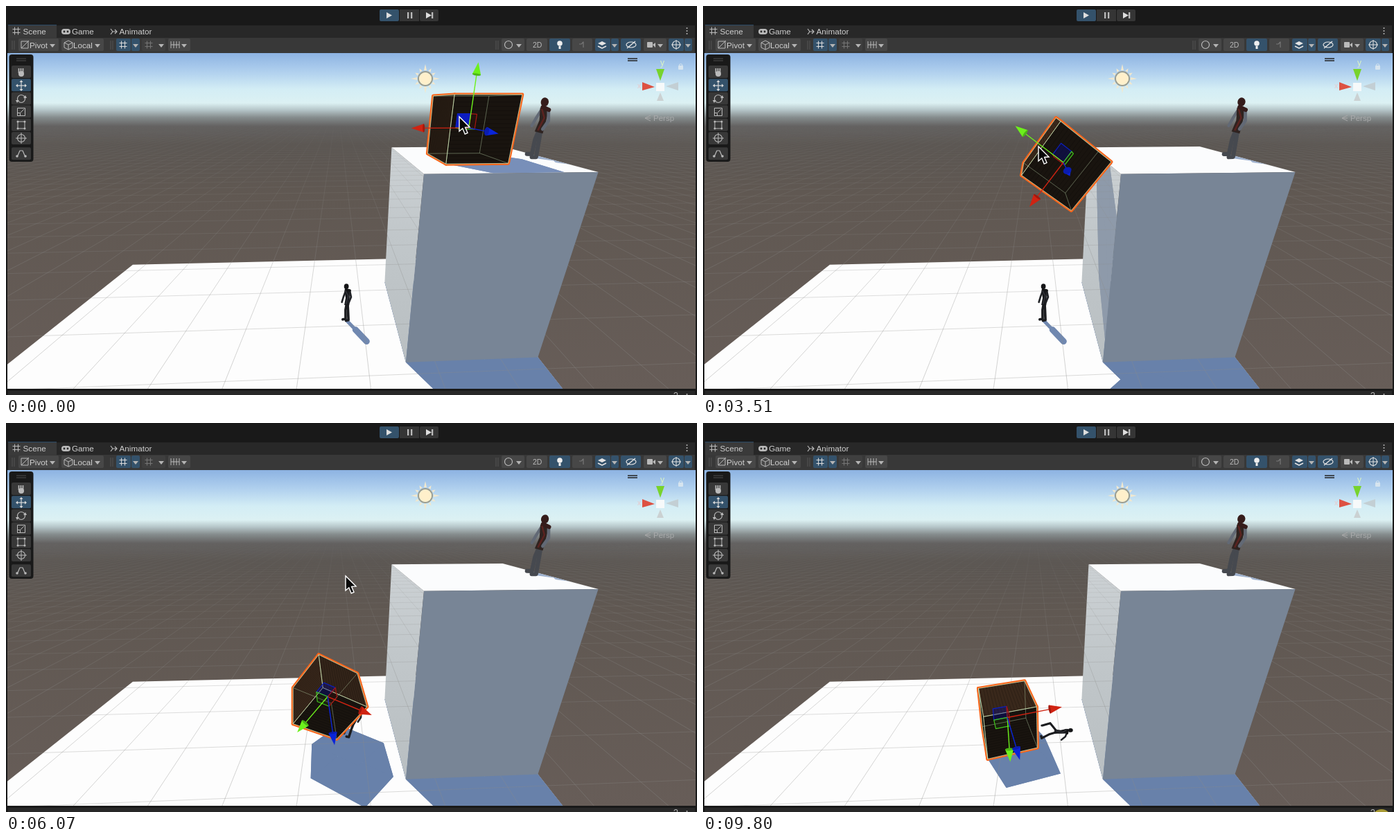
These frames come from a looping animation (997 px wide and 562 px high, 9.82 s). An HTML page with a canvas:

```html
<!DOCTYPE html>
<html lang="en">
<head>
<meta charset="utf-8">
<title>Falling crate</title>
<style>
  html, body { margin: 0; width: 100%; height: 100%; overflow: hidden; background: #191919; }
  canvas { display: block; }
</style>
</head>
<body>
<canvas id="stage" width="997" height="562"></canvas>
<script>
const ctx = document.getElementById('stage').getContext('2d');
const LOOP = 9820;
const ICON = '#bababa', BUTTON = '#474747', ACTIVE = '#34526b', SHADE = '#6881aa';

// ---- drawing helpers (points are lists of [x, y]) ----
const pairs = (...v) => v.flatMap((x, i) => i % 2 ? [] : [[x, v[i + 1]]]);
function trace(points, close) {
  ctx.beginPath();
  points.forEach(([x, y]) => ctx.lineTo(x, y));
  if (close) ctx.closePath();
}
function poly(points, color) { trace(points, true); ctx.fillStyle = color; ctx.fill(); }
function line(points, color, width = 1, close = false) {
  trace(points, close);
  ctx.strokeStyle = color;
  ctx.lineWidth = width;
  ctx.stroke();
}
function box(x, y, w, h, color, r = 0) {
  ctx.beginPath();
  ctx.roundRect(x, y, w, h, r);
  ctx.fillStyle = color;
  ctx.fill();
}
function frameBox(x, y, w, h, color) {
  ctx.strokeStyle = color;
  ctx.lineWidth = 1;
  ctx.strokeRect(x, y, w, h);
}
function oval(x, y, rx, ry, color, angle = 0) {
  ctx.beginPath();
  ctx.ellipse(x, y, rx, ry, angle, 0, 7);
  ctx.fillStyle = color;
  ctx.fill();
}
const dot = (x, y, r, color) => oval(x, y, r, r, color);
function ring(x, y, r, color, width = 1.2, ry = r) {
  ctx.beginPath();
  ctx.ellipse(x, y, r, ry, 0, 0, 7);
  ctx.strokeStyle = color;
  ctx.lineWidth = width;
  ctx.stroke();
}
function label(text, x, y, color = '#cfcfcf', size = 11.7) {
  ctx.font = size + 'px "Liberation Sans", sans-serif';
  ctx.fillStyle = color;
  ctx.fillText(text, x, y);
}
function fade(y0, y1, ...stops) {
  const g = ctx.createLinearGradient(0, y0, 0, y1);
  stops.forEach(([y, c]) => g.addColorStop((y - y0) / (y1 - y0), c));
  return g;
}
function scoped(draw) { ctx.save(); draw(); ctx.restore(); }
function clipped(points, draw) {
  scoped(() => { trace(points, true); ctx.clip(); draw(); });
}

// ---- motion: monotone cubic through key points [time, ...values] ----
function path(t, ...keys) {
  const last = keys.length - 1;
  if (t <= keys[0][0]) return keys[0].slice(1);
  if (t >= keys[last][0]) return keys[last].slice(1);
  const i = keys.findIndex(k => k[0] > t) - 1;
  const h = keys[i + 1][0] - keys[i][0], u = (t - keys[i][0]) / h;
  const chord = (j, c) => (keys[j + 1][c] - keys[j][c]) / (keys[j + 1][0] - keys[j][0]);
  const tangent = (j, c) => {
    if (j === 0 || j === last) return 0;
    const p = chord(j - 1, c), q = chord(j, c);
    return p * q > 0 ? 2 * p * q / (p + q) : 0;
  };
  return keys[i].slice(1).map((a, k) => {
    const c = k + 1, ease = u * u * (3 - 2 * u);
    return a + (keys[i + 1][c] - a) * ease
      + h * u * (1 - u) * ((1 - u) * tangent(i, c) - u * tangent(i + 1, c));
  });
}
const ramp = (t, from, to) => path(t, [from, 0], [to, 1])[0];

// ---- space: camera at the origin, x right, y up, z away, floor at y = -1 ----
function spin(a, b, degrees) {
  const r = degrees * Math.PI / 180, c = Math.cos(r), s = Math.sin(r);
  return [a * c - b * s, a * s + b * c];
}
const dotProduct = (a, b) => a.reduce((sum, v, i) => sum + v * b[i], 0);
const along = (p, dir, k) => p.map((v, i) => v + dir[i] * k);
function view([x, y, z]) {
  const [right, ahead] = spin(x, z, 2.6);
  const [depth, up] = spin(ahead, y, 22.3);
  return { right, up, depth };
}
function project(p) {
  const { right, up, depth } = view(p);
  return [498.5 + 419 * right / depth, 311 - 419 * up / depth];
}
const outline = points => points.map(project);

// six faces of a cuboid, ordered -x +x -y +y -z +z
function cuboid(center, half, orient = v => v) {
  const faces = [];
  for (let axis = 0; axis < 3; axis++) for (const side of [-1, 1]) {
    const place = (b, c) => {
      const v = [];
      v[axis] = side * half[axis];
      v[(axis + 1) % 3] = b * half[(axis + 1) % 3];
      v[(axis + 2) % 3] = c * half[(axis + 2) % 3];
      return along(center, orient(v), 1);
    };
    const normal = orient([0, 1, 2].map(i => i === axis ? side : 0));
    const points = [place(-1, -1), place(1, -1), place(1, 1), place(-1, 1)];
    faces.push({ normal, points, visible: dotProduct(normal, points[0]) < 0 });
  }
  return faces;
}

const LIGHT = [0.42, -1, -0.68];
const cast = (p, axis, level) => along(p, LIGHT, (level - p[axis]) / LIGHT[axis]);
function drawShadow(faces, axis, level, color) {
  faces.forEach(f => poly(outline(f.points.map(p => cast(p, axis, level))), color));
}

// ---- crate ----
function crateAt(t) {
  const [x] = path(t, [1150, 0.508], [2480, 0.171], [3510, 0.112], [5010, 0.029], [6070, -0.059], [7200, -0.146]);
  const [y] = path(t, [2850, -0.092], [3510, -0.222], [5010, -0.665], [6070, -0.769], [7200, -0.845],
    [7790, -0.845], [9200, -0.885]);
  const [roll] = path(t, [2800, 0], [3510, 53], [5010, 120], [6070, 145], [7200, 180]);
  const [tilt] = path(t, [5010, 0], [6070, 10], [7200, -10], [7790, -10], [9200, 0]);
  const yaw = 15 * ramp(t, 5010, 7200);
  const orient = ([a, b, c]) => {
    [a, b] = spin(a, b, roll);
    [c, b] = spin(c, b, tilt);
    [a, c] = spin(a, c, yaw);
    return [a, b, c];
  };
  const center = [x, y, 1.158];
  return { center, orient, faces: cuboid(center, [0.116, 0.116, 0.116], orient) };
}
function drawCrate({ faces }) {
  const seen = faces.filter(f => f.visible);
  ctx.lineJoin = 'round';
  seen.forEach(f => line(outline(f.points), '#f9651b', 5, true));
  seen.forEach(({ normal, points: [a, b, c, d] }) => {
    const lit = Math.min(1, Math.max(0, normal[1]) + Math.max(0, -normal[0]) * 0.5);
    poly(outline([a, b, c, d]), `rgb(${25 + 32 * lit},${20 + 20 * lit},${15 + 12 * lit})`);
    const mix = (p, q, k) => p.map((v, i) => v + (q[i] - v) * k);
    for (let k = 0.06; k < 1; k += 0.06)
      line(outline([mix(a, d, k), mix(b, c, k)]), 'rgba(0,0,0,.2)');
  });
  faces.forEach(f => line(outline(f.points), `rgba(205,235,190,${f.visible ? 0.6 : 0.2})`, 1, true));
}
function drawArrow([x, y], tip, color, dark) {
  const dx = tip[0] - x, dy = tip[1] - y, len = Math.hypot(dx, dy) || 1;
  const ux = dx / len, uy = dy / len, cone = Math.min(18, len * 0.4), r = 6.2;
  const bx = tip[0] - ux * cone, by = tip[1] - uy * cone;
  line([[x, y], [bx, by]], color, 1.4);
  poly([tip, [bx - uy * r, by + ux * r], [bx + uy * r, by - ux * r]], color);
  oval(bx, by, r * Math.max(0.25, 1 - len / 95), r, dark, Math.atan2(dy, dx));
}
const redTip = ({ center, orient }) => along(center, orient([-1, 0, 0]), 0.2 * view(center).depth);
function drawHandles({ center, orient }, t) {
  const reach = 0.2 * view(center).depth, origin = project(center);
  const axes = [[-1, 0, 0], [0, 1, 0], [0, 0, -1]].map(orient);
  const facing = axes.map(a => dotProduct(a, center) < 0 ? a : a.map(v => -v));
  const plane = (a, b, stroke, fill) => {
    const p = along(center, a, reach * 0.23), q = along(center, b, reach * 0.23);
    const quad = outline([center, p, along(p, b, reach * 0.23), q]);
    poly(quad, fill);
    line(quad, stroke, 1.2, true);
  };
  plane(facing[0], facing[1], '#0b1fc0', t < 450 ? '#0c1cc0' : 'rgba(0,10,150,.35)');
  plane(facing[0], facing[2], '#42c61c', 'rgba(40,150,20,.1)');
  plane(facing[1], facing[2], '#a81612', 'rgba(150,10,10,.1)');
  const colors = [['#d02312', '#a3180c'], ['#6df01c', '#4bb516'], ['#0a24d8', '#0a1cb0']];
  axes.forEach((a, i) => drawArrow(origin, project(along(center, a, reach)), ...colors[i]));
}

// ---- scenery ----
const BLOCK = cuboid([0.548, -0.6035, 1.1725], [0.282, 0.3965, 0.2905]);
const SIDE = outline(BLOCK[0].points), TOP = outline(BLOCK[3].points), FRONT = outline(BLOCK[4].points);
const FLOOR = outline([[-1.376, -1, 1.74], [0.83, -1, 1.74], [0.83, -1, 0.3], [-1.376, -1, 0.3]]);
const SIDE_X = 0.266, TOP_Y = -0.207;

function drawGrid() {
  const ink = a => `rgba(138,138,136,${a})`, step = 0.28;
  const receding = fade(150, 553, [160, ink(0)], [230, ink(0.14)], [380, ink(0.33)], [553, ink(0.38)]);
  for (let k = -60; k <= 60; k++) {
    const x = 0.108 + step * k;
    line(outline([[x, -1, 0.25], [x, -1, 14]]), receding);
  }
  for (let z = 0.265; z < 12; z += step)
    line(outline([[-z - 8, -1, z], [z + 8, -1, z]]), ink(0.38 * Math.exp(-z / 4.5)));
}
function drawFigureShadow(foot, height, color) {
  const head = cast(along(foot, [0, 1, 0], height), 1, foot[1]);
  ctx.lineCap = 'round';
  line(outline([foot, head]), color, 5);
  line(outline([along(foot, LIGHT, height * 0.45), head].map(p => [p[0], foot[1], p[2]])), color, 9);
  ctx.lineCap = 'butt';
}
function drawWorld(t, crate) {
  box(2, 68, 993, 485, fade(68, 553,
    [68, '#8db3e2'], [95, '#b0d0ee'], [120, '#d3edf5'], [140, '#dcf1f3'], [150, '#b6c6c9'],
    [161, '#858c8d'], [174, '#636160'], [200, '#5b5652'], [270, '#605852'], [553, '#675d58']));
  poly(FLOOR, '#fdfdfd');
  clipped(FLOOR, () => {
    drawShadow(BLOCK, 1, -1, SHADE);
    drawShadow(crate.faces, 1, -1, SHADE);
    if (t < 5600) drawFigureShadow([0.03, -1, 1.139], 0.2, '#7088b0');
  });
  poly(SIDE, fade(204, 514, [204, '#cdd2d5'], [330, '#c1c7ca'], [514, '#b9bfc2']));
  clipped(SIDE, () => drawShadow(crate.faces, 0, SIDE_X, '#8e9aaa'));
  drawGrid();
  poly(TOP, '#fbfcfd');
  clipped(TOP, () => {
    drawFigureShadow([0.806, TOP_Y, 1.181], 0.25, '#9db0cd');
    drawShadow(crate.faces, 1, TOP_Y, '#788fb9');
  });
  poly(FRONT, '#788596');
}
function drawSun() {
  scoped(() => {
    ctx.translate(605, 105);
    for (let i = 0; i < 12; i++) {
      poly([[i % 3 ? 17 : 21, 0], [12, 2], [12, -2]], '#f1e8cf');
      ctx.rotate(Math.PI / 6);
    }
  });
  ring(605, 105, 10, '#9c9e90', 2);
  dot(605, 105, 9, '#fff0cb');
}

// ---- figures: one unit-height body facing left, leaned about the feet ----
function drawFigure(x, y, height, lean, bend, c) {
  scoped(() => {
    ctx.translate(x, y);
    ctx.rotate(lean * Math.PI / 180);
    ctx.scale(height, height);
    ctx.lineCap = ctx.lineJoin = 'round';
    const limb = (color, width, ...v) => line(pairs(...v), color, width);
    limb(c.arm, 0.05, -0.05, -0.78, -0.1 + bend * 0.1, -0.63, -0.14 + bend * 0.14, -0.48);
    limb(c.leg, 0.07, 0, -0.48, -0.03 - bend * 0.24, -0.27, -0.02 - bend * 0.18, -0.02, -0.1 - bend * 0.1, 0);
    limb(c.leg, 0.07, 0.02, -0.48, 0.04 + bend * 0.04, -0.25, 0.06 + bend * 0.15, 0.01, -0.01 + bend * 0.15, 0.03);
    poly(pairs(-0.08, -0.81, 0.07, -0.83, 0.07, -0.62, 0.07, -0.4, -0.07, -0.4, -0.04, -0.6), c.body);
    limb(c.trim, 0.03, -0.05, -0.8, 0.03, -0.66, -0.02, -0.44);
    limb(c.arm, 0.055, 0.07, -0.79, 0.11 + bend * 0.06, -0.63 - bend * 0.12, 0.05 + bend * 0.22, -0.47 - bend * 0.15);
    limb(c.hood, 0.07, -0.04, -0.83, 0.07, -0.81);
    oval(-0.03, -0.92, 0.065, 0.075, c.hood);
  });
}
const WATCHER = { arm: '#626975', leg: '#46494f', body: '#2f2320', trim: '#5a2320', hood: '#351c1b' };
const VICTIM = { arm: '#202226', leg: '#1b1c1f', body: '#17181b', trim: '#303238', hood: '#141517' };
function drawFigures(t) {
  const fall = ramp(t, 5600, 6900), settle = ramp(t, 7790, 9000);
  drawFigure(491 - 2 * fall, 453 - 7 * fall, 52 - 10 * fall + 3 * settle, 2 + 92 * fall - 5 * settle, fall, VICTIM);
  drawFigure(760, 216, 86, 14.5 + Math.sin(t / 900) * 0.4, 0, WATCHER);
}

// ---- editor interface ----
const caret = (x, y = 57) => poly([[x - 4, y - 2], [x + 4, y - 2], [x, y + 3]], '#b4b4b4');
function hatch(x, y, color) {
  for (const d of [-2.5, 2.5]) {
    line([[x + d, y - 5.5], [x + d, y + 5.5]], color);
    line([[x - 5.5, y + d], [x + 5.5, y + d]], color);
  }
}
function drawPlayBar() {
  box(539, 5, 28, 17, ACTIVE, 2);
  box(568, 5, 28, 17, '#353535');
  box(597, 5, 27, 17, '#353535', 2);
  for (const x of [549, 606]) poly([[x, 9], [x + 8, 13.5], [x, 18]], '#dedede');
  for (const x of [579, 584, 614]) box(x, 9, 2.3, 9, ICON);
}
function drawTabs() {
  box(3, 28, 991, 18, '#282828');
  box(3, 28, 70, 18, '#3a3a3a');
  box(3, 27, 70, 1, '#2c4a66');
  hatch(15, 36, ICON);
  label('Scene', 24.5, 41);
  box(80, 33, 13, 8, ICON, 4);
  for (const x of [84, 89]) dot(x, 37, 1.4, '#282828');
  label('Game', 95, 41);
  line(pairs(151, 33, 154, 37, 160, 37, 157, 34), ICON, 1.2);
  line(pairs(151, 41, 154, 37), ICON, 1.2);
  line(pairs(157, 40, 160, 37), ICON, 1.2);
  label('Animator', 163.5, 41);
  for (const y of [32, 36, 40]) dot(982.5, y, 1, ICON);
}
function drawToolRow() {
  box(3, 46, 991, 22, '#383838');
  for (const x of [9, 12, 151, 154, 707, 710]) line([[x, 50], [x, 63]], '#555');
  const button = (x, w, color = BUTTON) => box(x, 47, w, 18, color, 2);
  button(18, 58);
  button(80, 61);
  button(159, 21, ACTIVE);
  button(181, 12, ACTIVE);
  button(196, 34, '#3f3f3f');
  button(234, 32);
  frameBox(22, 51, 10, 10, ICON);
  line([[22, 61], [33, 50]], ICON);
  label('Pivot', 34, 60.5);
  line(pairs(90, 50, 96, 53, 96, 60, 90, 63, 84, 60, 84, 53), ICON, 1, true);
  line(pairs(84, 53, 90, 56, 96, 53), ICON);
  line([[90, 56], [90, 63]], ICON);
  label('Local', 97, 60.5);
  hatch(169, 56, '#dcdcdc');
  hatch(206, 56, '#757575');
  for (let x = 238; x < 251; x += 4) line([[x, 51], [x, 61]], ICON);
  line([[238, 56], [250, 56]], ICON);

  for (const [x, w] of [[715, 33], [751, 30], [817, 29], [920, 33]]) button(x, w);
  for (const [x, w] of [[784, 30], [850, 22], [873, 11], [887, 29], [956, 22], [979, 11]]) button(x, w, ACTIVE);
  ring(725, 56, 5.5, ICON);
  label('2D', 760, 60, ICON, 10.5);
  dot(799, 54, 3.8, '#eee');
  box(797.5, 58, 3, 4, '#eee');
  line(pairs(827, 55, 830, 55, 833, 52, 833, 60), '#777', 1.2);
  poly(pairs(854, 54, 860, 51, 866, 54, 860, 57), '#e4e4e4');
  line(pairs(854, 58, 860, 61, 866, 58), '#e4e4e4', 1.5);
  ring(902, 56, 7, '#e4e4e4', 1.2, 4);
  line([[896, 61], [908, 51]], '#e4e4e4', 1.4);
  box(925, 52, 8, 8, ICON, 1);
  poly(pairs(933, 56, 937, 53, 937, 60), ICON);
  ring(967, 56, 5.5, '#e4e4e4');
  line([[960, 56], [974, 56]], '#e4e4e4');
  line([[967, 49], [967, 63]], '#e4e4e4');
  for (const x of [67, 132, 187, 224, 257, 740, 878, 944, 984]) caret(x);
}
function drawInterface() {
  box(0, 0, 997, 68, '#191919');
  box(0, 68, 2, 494, '#191919');
  box(995, 68, 2, 494, '#191919');
  box(0, 553, 997, 9, '#191919');
  box(3, 556, 991, 6, '#282828');
  drawPlayBar();
  drawTabs();
  drawToolRow();
  label('?', 963, 567, ICON, 12);
  dot(982.5, 561, 1, ICON);
}
function drawToolStrip() {
  box(4.5, 70, 35, 155, '#191919', 4);
  for (const y of [76, 79]) line([[15, y], [29, y]], '#4c4c4c');
  for (let i = 0; i < 7; i++) {
    const y = 86 + 19.2 * i + (i === 6 ? 3 : 0);
    box(8, y, 28, 18, i === 1 ? ACTIVE : '#383838', 2);
  }
  dot(22, 98, 4, ICON);
  for (const x of [18.5, 21.5, 24.5]) line([[x, 97], [x, 90]], ICON, 1.7);
  scoped(() => {
    ctx.translate(22, 115);
    for (let i = 0; i < 4; i++) {
      line([[0, 0], [0, -6]], '#dadada', 1.2);
      poly([[0, -8], [-2.5, -5], [2.5, -5]], '#dadada');
      ctx.rotate(Math.PI / 2);
    }
  });
  ring(22, 134, 5.5, ICON);
  poly(pairs(25, 133, 30, 133, 28, 129), ICON);
  poly(pairs(14, 136, 19, 136, 16, 140), ICON);
  frameBox(16.5, 147.5, 11, 11, ICON);
  frameBox(16.5, 154.5, 4, 4, ICON);
  line([[21, 154], [26, 149]], ICON);
  frameBox(17, 167, 10, 10, ICON);
  for (const x of [17, 27]) for (const y of [167, 177]) dot(x, y, 1.5, ICON);
  ring(22, 191, 5.5, ICON);
  line([[14, 191], [30, 191]], ICON);
  line([[22, 183], [22, 199]], ICON);
  line(pairs(17, 216, 20, 209, 24, 209, 27, 216), ICON, 1.2);
  for (const x of [16, 28]) dot(x, 217, 1.8, ICON);
}
function drawViewGizmo() {
  for (const y of [76, 79]) line([[897, y], [911, y]], '#222', 1.5);
  poly(pairs(936, 117, 918, 110, 918, 122), '#dd5142');
  poly(pairs(952, 116, 970, 110, 970, 122), '#c3cfd4');
  poly(pairs(944, 108, 938, 91, 950, 91), '#78d32c');
  poly(pairs(944, 125, 939, 137, 949, 137), '#cbd1d2');
  box(938, 111, 12, 12, '#f6f9fa');
  label('y', 944, 86, '#d9f3c4', 12);
  label('x', 911, 119, '#e7c9cb', 10);
  box(970, 86, 7, 6, '#d6e4ef', 1);
  ring(973.5, 86, 2.3, '#d6e4ef', 1);
  line(pairs(930, 158, 922, 162, 930, 166), '#a9a9a9');
  line([[922, 162], [930, 162]], '#a9a9a9');
  label('Persp', 934, 166, '#a9aaab', 11.5);
}
function cursorAt(t, crate) {
  if (t > 2800)
    return path(t, [2800, 463, 172], [3510, 484, 203], [4200, 490, 221], [6200, 490, 221],
      [7300, 502, 228], [7800, 502, 228], [8200, 842, 566]);
  const [x, y] = project(redTip(crate)), k = ramp(t, 0, 1000);
  return [654 + (x + 9 - 654) * k, 160 + (y - 10 - 160) * k];
}
function drawCursor(t, crate) {
  if (t > 9780) dot(979, 572, 14, '#a89a35');
  if (t > 8200) return;
  scoped(() => {
    ctx.translate(...cursorAt(t, crate));
    ctx.lineJoin = 'miter';
    const arrow = pairs(0, 0, 0, 21, 4.8, 16.8, 8.2, 25, 12, 23.3, 8.6, 15.4, 15, 15);
    poly(arrow, '#080808');
    line(arrow, '#fff', 1.4, true);
  });
}

const start = performance.now();
function frame() {
  const t = (performance.now() - start) % LOOP, crate = crateAt(t);
  ctx.lineJoin = 'miter';
  drawWorld(t, crate);
  drawFigures(t);
  drawSun();
  drawCrate(crate);
  drawHandles(crate, t);
  drawViewGizmo();
  drawInterface();
  drawToolStrip();
  drawCursor(t, crate);
  requestAnimationFrame(frame);
}
frame();
</script>
</body>
</html>
```
